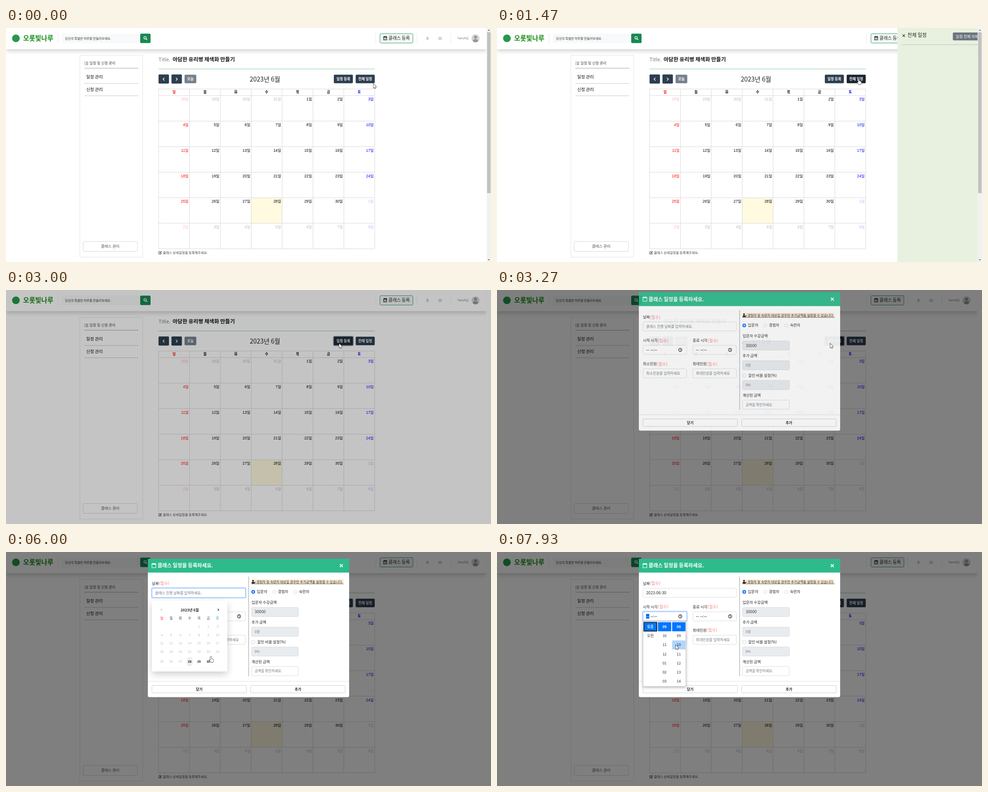
Write an HTML page with a canvas that moves like this. It is 1077 px wide and 520 px high and loops after 8 s.

```html
<!DOCTYPE html>
<html lang="ko">
<head>
<meta charset="utf-8">
<title>Class schedule</title>
<style>
html, body { margin: 0; width: 100%; height: 100%; overflow: hidden; background: #fff; }
canvas { display: block; width: 1077px; height: 520px; }
</style>
</head>
<body>
<canvas id="stage"></canvas>
<script>
const W = 1077, H = 520, LOOP = 8000, STEP = 1000 / 15;
const dpr = window.devicePixelRatio || 1;
const FONT = '"Noto Sans CJK KR", "Noto Sans CJK", sans-serif';
const ARIAL = '"Liberation Sans", "Noto Sans CJK KR", sans-serif';
const NAVY = '#2c3e50', GREEN = '#198754', HINT = '#6c757d';

function setup(canvas) {
  canvas.width = W * dpr;
  canvas.height = H * dpr;
  const ctx = canvas.getContext('2d');
  ctx.scale(dpr, dpr);
  return ctx;
}
const screenCtx = setup(document.getElementById('stage'));
const spare = document.createElement('canvas');
const spareCtx = setup(spare);
let g = screenCtx;

// ---- helpers ----
const clamp = v => Math.max(0, Math.min(1, v));
const progress = (t, start, length) => clamp((t - start) / length);
const smooth = p => p * p * (3 - 2 * p);
const easeInOut = p => p < .5 ? 2 * p * p : 1 - 2 * (1 - p) ** 2;
const easeOut = p => 1 - (1 - p) ** 1.85;

function text(s, x, y, size, color = '#222', weight = 400, align = 'left', font = FONT) {
  g.font = `${weight} ${size}px ${font}`;
  g.fillStyle = color;
  g.textAlign = align;
  g.fillText(s, x, y + size * .37);
}

function box(x, y, w, h, fill, stroke, r = 0) {
  g.beginPath();
  g.roundRect(x, y, w, h, r);
  if (fill) { g.fillStyle = fill; g.fill(); }
  if (stroke) { g.strokeStyle = stroke; g.lineWidth = .8; g.stroke(); }
}

function shadowBox(x, y, w, h, fill, r, dy, blur, alpha) {
  g.save();
  g.shadowColor = `rgba(0,0,0,${alpha})`;
  g.shadowBlur = blur * dpr;
  g.shadowOffsetY = dy * dpr;
  box(x, y, w, h, fill, null, r);
  g.restore();
}

function line(color, width, ...pts) {
  g.beginPath();
  for (let i = 0; i < pts.length; i += 2) g.lineTo(pts[i], pts[i + 1]);
  g.strokeStyle = color;
  g.lineWidth = width;
  g.stroke();
}

function disc(x, y, r, fill, stroke, width = 1) {
  g.beginPath();
  g.arc(x, y, r, 0, 7);
  if (fill) { g.fillStyle = fill; g.fill(); }
  if (stroke) { g.strokeStyle = stroke; g.lineWidth = width; g.stroke(); }
}

function cross(x, y, r, color, width) {
  line(color, width, x - r, y - r, x + r, y + r);
  line(color, width, x + r, y - r, x - r, y + r);
}

function chevron(x, y, dir, size, color, width) {
  line(color, width, x - dir * size / 2, y - size, x + dir * size / 2, y, x - dir * size / 2, y + size);
}

function calendarIcon(x, y, s, color) {
  g.strokeStyle = color;
  g.lineWidth = 1.1;
  g.strokeRect(x + .5, y + 1.5, s - 1, s - 1);
  g.fillStyle = color;
  g.fillRect(x, y + 1, s, 2.2);
  g.fillRect(x + s * .22, y - .4, 1.3, 2);
  g.fillRect(x + s * .64, y - .4, 1.3, 2);
}

function layer(alpha, draw) {
  if (alpha <= 0) return;
  if (alpha >= 1) return draw();
  spareCtx.clearRect(0, 0, W, H);
  g = spareCtx;
  draw();
  g = screenCtx;
  g.globalAlpha = alpha;
  g.drawImage(spare, 0, 0, W, H);
  g.globalAlpha = 1;
}

// ---- page ----
function header() {
  g.save();
  g.beginPath();
  g.rect(0, 0, 1067.5, H);
  g.clip();
  shadowBox(0, -10, 1067.5, 57, '#fff', 0, 4.5, 9, .17);
  g.restore();
  disc(22, 23, 8.5, '#25994a');
  text('오롯빛나루', 38, 22.5, 14.6, '#138a13', 900);
  for (const x of [115.5, 821, 912.5, 987.5]) line('#e4e6e8', .8, x, 12, x, 34);

  box(124, 12.5, 176, 21, '#f8f9fa', null, 2);
  text('당신의 특별한 하루를 만들어보세요.', 131, 23, 6.95, '#333');
  box(298, 12.5, 23, 21, GREEN, null, 2.5);
  disc(308.9, 21.8, 2.7, null, '#fff', 1.3);
  line('#fff', 1.5, 310.9, 23.8, 313.5, 26.4);

  box(830.4, 12.6, 73.2, 20.8, '#f1f8f4', GREEN, 2.5);
  calendarIcon(838, 18, 8, '#222');
  line('#222', 1, 840, 23.5, 841.6, 25, 844.2, 22.2);
  text('클래스 등록', 849.3, 22.7, 9.9, '#222');

  g.fillStyle = '#c9cedb';
  g.beginPath();
  g.moveTo(932.3, 25.2);
  g.quadraticCurveTo(933.6, 24, 933.6, 22);
  g.arc(936, 21.6, 2.4, Math.PI, 0);
  g.quadraticCurveTo(938.4, 24, 939.7, 25.2);
  g.fill();
  disc(936, 26, 1.1, '#c9cedb');
  box(960, 20, 8, 6.2, '#c9cedb', null, 1);
  line('#fff', .8, 960, 21.3, 964, 24, 968, 21.3);

  text('haru4님', 1003, 23, 6.6, '#777');
  disc(1042.6, 23, 9, '#d3d4d6');
  disc(1042.6, 20.4, 3.3, '#94979b');
  g.beginPath();
  g.ellipse(1042.6, 28.3, 5.8, 3.6, 0, 0, 7);
  g.fill();
}

function sidebar() {
  box(164, 61, 139.6, 448, null, '#dcdcdc');
  for (let i = 0; i < 3; i++) {
    const y = 75.8 + i * 2.8;
    line('#555', 1, 174, y, 175.6, y);
    line('#555', 1, 177, y, 182.6, y);
  }
  text('일정 및 신청 관리', 185.3, 78.5, 8.1, '#444');
  line('#9aa8a0', 1, 174, 89.3, 294, 89.3);
  text('일정 관리', 178, 108.8, 9.5, '#111', 500);
  line('#c8c8c8', 1, 174, 123.3, 294, 123.3);
  text('신청 관리', 178, 136.3, 9.5, '#111', 500);
  line('#c8c8c8', 1, 174, 150.6, 294, 150.6);
  box(171.4, 474.4, 120.4, 22, '#fff', '#cfcfcf', 2);
  text('클래스 관리', 231.4, 485, 8.5, '#555', 400, 'center');
}

function button(x, y, w, h, label, fill) {
  box(x, y, w, h, fill, null, 2);
  text(label, x + w / 2, y + h / 2 - .1, 7.9, '#fff', 700, 'center');
}

function calendar(t, pos) {
  text('Title.', 338.8, 70, 11, '#777');
  text('아담한 유리병 채색화 만들기', 370, 69.7, 11.8, '#111', 700);
  line('#c5e5d8', 2, 338.6, 91, 819, 91);

  const over = x => t < 2930 && pos.x > x && pos.x < x + 42.5 && pos.y > 103 && pos.y < 123;
  const focused = t > 2860 && t < 3430;
  box(338.7, 103.3, 23.2, 20.2, NAVY, null, 2);
  chevron(350.2, 113.7, -1, 3.1, '#fff', 1.4);
  box(367.4, 103.3, 23.2, 20.2, NAVY, null, 2);
  chevron(379, 113.7, 1, 3.1, '#fff', 1.4);
  button(396.5, 103.8, 26, 19, '오늘', '#76818c');
  text('2023년 6월', 575, 113.8, 14, '#222', 400, 'center');
  if (focused) box(726.2, 102, 46, 22.6, '#96a0a8', null, 4);
  button(728, 103.8, 42.3, 19, '일정 등록', focused || over(728) ? '#1e2b37' : NAVY);
  button(776.5, 103.8, 42.3, 19, '전체 일정', over(776.5) ? '#1a252f' : NAVY);

  const x0 = 338.9, cw = 68.55, y0 = 150.2, rh = 56.75;
  const hue = ['255,0,0', '0,0,0', '0,0,0', '0,0,0', '0,0,0', '0,0,0', '0,0,255'];
  g.fillStyle = '#fffae0';
  g.fillRect(x0 + 3 * cw, y0 + 4 * rh, cw, rh);
  for (let c = 0; c < 8; c++) line('#d9d9d9', 1, x0 + c * cw, 135.5, x0 + c * cw, y0 + 6 * rh);
  line('#d9d9d9', 1, x0, 135.5, x0 + 7 * cw, 135.5);
  for (let r = 0; r < 7; r++) line('#d9d9d9', 1, x0, y0 + r * rh, x0 + 7 * cw, y0 + r * rh);
  [...'일월화수목금토'].forEach((d, c) =>
    text(d, x0 + (c + .5) * cw, 142.2, 7.6, `rgb(${hue[c]})`, 700, 'center'));
  for (let i = 0; i < 42; i++) {
    const c = i % 7, n = i - 3, here = n > 0 && n <= 30;
    const day = n < 1 ? n + 31 : here ? n : n - 30;
    text(day + '일', x0 + (c + 1) * cw - 2.2, y0 + Math.floor(i / 7) * rh + 8, 8.4,
      `rgba(${hue[c]},${here ? 1 : .28})`, 400, 'right', ARIAL);
  }

  g.strokeStyle = '#444';
  g.lineWidth = 1;
  g.strokeRect(339.4, 497, 5, 5.4);
  line('#fff', 2.6, 342, 500, 346, 496);
  line('#444', 1.5, 341.6, 500.6, 345.6, 496.4);
  text('클래스 상세일정을 등록해주세요.', 348.2, 499.3, 7.35, '#444');
}

function scrollbar() {
  g.fillStyle = '#f1f1f1';
  g.fillRect(1067.5, 0, 9.5, H);
  g.fillStyle = '#c1c1c1';
  g.fillRect(1068.3, 9.5, 7.8, 357.5);
  g.fillStyle = '#555';
  for (const [y, d] of [[5, -1], [515, 1]]) {
    g.beginPath();
    g.moveTo(1070, y - d);
    g.lineTo(1074.4, y - d);
    g.lineTo(1072.2, y + d * 1.4);
    g.fill();
  }
}

function drawer(t) {
  const open = easeInOut(progress(t, 560, 300)) - easeInOut(progress(t, 1402, 300));
  if (open <= 0) return;
  const x = 1067.5 - 196.5 * open;
  g.save();
  g.beginPath();
  g.rect(0, 0, 1067.5, H);
  g.clip();
  g.fillStyle = '#e8f1df';
  g.fillRect(x, 0, 197, H);
  cross(x + 14, 17, 2.8, '#222', 1.1);
  text('전체 일정', x + 22, 16.3, 11, '#222', 500);
  box(x + 123, 10, 63, 17.5, HINT, null, 2);
  text('일정 전체 삭제', x + 154.5, 18.6, 8.4, '#fff', 400, 'center');
  line('#b9c1b2', 1, x + 10, 37, x + 186, 37);
  g.restore();
}

// ---- modal ----
function field(x, y, w, value, opt = {}) {
  if (opt.focus) box(x - 2, y - 2, w + 4, 25, '#c2dbfe', null, 4);
  box(x + .4, y + .4, w - .8, 20.2, opt.off ? '#e9ecef' : '#fff', opt.focus ? '#86b7fe' : '#ced4da', 2.5);
  text(value, x + 7.3, y + 10.4, opt.size || 8, opt.color || HINT);
}

function label(s, x, y, width) {
  text(s, x, y, 8.4, '#222');
  if (width) text('(필수)', x + width, y, 9.4, '#f58585');
}

function timeField(x, focus) {
  field(x, 132.5, 97.5, '', { focus });
  if (focus) box(331, 137.6, 7.2, 10.4, '#0b6be0');
  const dash = (dx, color) => line(color, .9, x + dx, 143.6, x + dx + 2.5, 143.6);
  [7.6, 11, 17.2, 20.4, 25.6, 28.8].forEach((dx, i) => dash(dx, focus && i < 2 ? '#fff' : '#333'));
  g.fillStyle = '#333';
  g.fillRect(x + 23.7, 141, .9, 1);
  g.fillRect(x + 23.7, 144.6, .9, 1);
  disc(x + 83, 143, 3.6, null, '#111', 1.1);
  line('#111', 1, x + 83, 140.6, x + 83, 143.2, x + 84.8, 144.2);
}

function modalBox(t) {
  const picked = t >= 6390;
  box(315, 15, 447, 307.5, '#fff', null, 3.5);
  box(315, 15, 447, 30.7, '#2dbb8b', null, [3.5, 3.5, 0, 0]);
  calendarIcon(323.6, 24.8, 9.6, '#fff');
  text('클래스 일정을 등록하세요.', 336.6, 30.3, 11.3, '#fff', 700);
  cross(744.6, 30.3, 3.2, '#fff', 1.9);

  label('날짜', 324, 70, 15.4);
  field(324, 80.3, 208, picked ? '2023-06-30' : '클래스 진행 날짜를 입력하세요.',
    { focus: t >= 3930 && t < 6450, color: picked ? '#222' : HINT, size: picked ? 8.7 : 8 });
  label('시작 시각', 324, 122, 33);
  label('종료 시각', 434.6, 122, 33);
  timeField(324, t >= 6990);
  timeField(434.5, false);
  label('최소인원', 324, 174, 31);
  label('최대인원', 434.6, 174, 31);
  field(324, 184.6, 97.5, '최소인원을 입력하세요');
  field(434.5, 184.6, 97.5, '최대인원을 입력하세요');

  line('#999', 1, 538.8, 54.5, 538.8, 276);
  box(545, 61, 204.5, 10.4, '#fdebd3');
  disc(548.6, 63.8, 1.9, '#222');
  box(545.6, 66.2, 6, 3.8, '#222', null, [2, 2, 0, 0]);
  line('#222', 1.4, 551, 69.6, 554, 66.4);
  text('경험자 및 숙련자 대상일 경우만 추가금액을 설정할 수 있습니다.', 556, 66.2, 7.4, '#222', 500);
  line('#222', .7, 545, 70.8, 749.5, 70.8);

  ['입문자', '경험자', '숙련자'].forEach((s, i) => {
    const x = 549 + i * 46.7;
    if (i) disc(x, 88.7, 3.6, '#fff', '#c5c9cd', .7);
    else { disc(x, 88.7, 4.1, '#0d6efd'); disc(x, 88.7, 1.7, '#fff'); }
    text(s, x + 8, 88.3, 8.4);
  });
  label('입문자 수강금액', 545.3, 112.2);
  field(545, 122.8, 104.6, '30000', { off: true, size: 8.8, color: '#333' });
  label('추가 금액', 545.3, 156.3);
  field(545, 166.7, 104.6, '0원', { off: true, size: 7.7 });
  box(545.6, 196.6, 7, 7, '#fff', '#c8ccd0', 1.4);
  label('할인 비율 설정(%)', 558, 200);
  field(545, 210.6, 104.6, '0%', { off: true, size: 7.7 });
  label('계산된 금액', 545.3, 243.7);
  field(545, 254.2, 104.6, '금액을 확인하세요.', { size: 7.7 });

  line('#dee2e6', 1, 315, 287.3, 762, 287.3);
  for (const [x, s] of [[324, '닫기'], [543.3, '추가']]) {
    box(x, 296.6, 210, 16.5, '#fff', '#bfc3c7', 1.5);
    text(s, x + 105, 304.9, 8, '#222', 700, 'center');
  }
}

function picker() {
  shadowBox(324, 108, 167.5, 157.5, '#fff', 2, 6, 16, .2);
  text('2023년 6월', 408, 128.6, 8.1, '#222', 700, 'center');
  chevron(345, 128.2, -1, 2.1, '#b5b5b5', 1.1);
  chevron(471.4, 128.2, 1, 2.1, '#222', 1.3);
  const col = c => 346 + 20.65 * c;
  [...'일월화수목금토'].forEach((d, c) =>
    text(d, col(c), 147, 7.5, c ? c === 6 ? '#1590d6' : '#444' : '#f22', 400, 'center'));
  g.beginPath();
  g.ellipse(407.8, 243.5, 7.3, 10.6, 0, 0, 7);
  g.fillStyle = '#eee';
  g.fill();
  for (let d = 1; d <= 30; d++) {
    const i = d + 3, row = Math.floor(i / 7), live = d >= 28;
    text(d, col(i % 7), row === 4 ? 243.5 : 165.6 + row * 18.45, 6.9,
      live ? '#222' : '#bcbcbc', live ? 700 : 400, 'center', ARIAL);
  }
}

function timeList(pos) {
  shadowBox(324, 154, 95.6, 145, '#fff', 2, 2, 6, .3);
  box(324.2, 154.2, 95.2, 144.6, '#fff', '#b9b9b9', 2);
  const two = n => String(n).padStart(2, '0');
  const hours = Array.from({ length: 7 }, (_, i) => two((i + 8) % 12 + 1));
  const minutes = Array.from({ length: 7 }, (_, i) => two(i + 8));
  [['오후', '오전'], hours, minutes].forEach((items, c) => {
    const x = 325.8 + c * 31.6;
    items.forEach((s, i) => {
      const y = 156 + i * 20.2;
      const hover = i && pos.x >= x && pos.x < x + 29.5 && pos.y >= y && pos.y < y + 20.2;
      if (!i || hover) box(x, y, 29.5, 20.2, i ? '#b0d5ff' : '#0075ff', null, 1);
      if (!c && !i) {
        g.strokeStyle = '#111';
        g.lineWidth = 1.6;
        g.strokeRect(x + .5, y + .5, 28.5, 19.2);
      }
      text(s, x + 14.7, y + 10.1, 7.9, i ? '#222' : '#fff', i ? 400 : 700, 'center');
    });
  });
}

// ---- pointer ----
const PATH = [
  [70, 816, 124], [400, 803.5, 113], [1500, 803.5, 113], [2070, 567, 113], [2130, 567, 113],
  [2400, 669.5, 114], [2870, 740, 119], [3270, 740, 119], [3730, 440, 91], [3930, 440, 91],
  [4300, 410, 92], [4730, 336, 91], [4800, 336, 91], [5400, 466, 145], [5670, 466, 145],
  [5990, 455, 232.5], [6530, 455, 232.5], [7000, 404, 141], [7600, 404, 142], [7900, 397, 206.5]
];

function pointerAt(t) {
  const i = PATH.findIndex(k => k[0] > t);
  if (i === 0) return { x: PATH[0][1], y: PATH[0][2] };
  const b = i < 0 ? PATH[PATH.length - 1] : PATH[i];
  const a = i < 0 ? b : PATH[i - 1];
  const p = a === b ? 1 : smooth((t - a[0]) / (b[0] - a[0]));
  return { x: a[1] + (b[1] - a[1]) * p, y: a[2] + (b[2] - a[2]) * p };
}

const ARROW = new Path2D('M0 0V9.4L2.2 7.4 3.6 10.6 5 10 3.7 6.9H6.5Z');
const HAND = new Path2D('M-1 1a1 1 0 0 1 2 0V5l3.6.8q1.2.4 1 1.6L5 10.5 4.4 12.6H.2L-3 8.4q-.9-1.3.3-1.5L-1 7.8Z');

function pointer(t, { x, y }) {
  const inRect = (l, top, r, b) => x > l && x < r && y > top && y < b;
  const onButton = t < 2930 && (inRect(728, 103, 770, 123) || inRect(776, 103, 819, 123));
  const onDay = t > 5900 && t < 6600 && inRect(440, 231, 462, 255);
  if (t > 3500 && t < 5300 && inRect(324, 80, 532, 102)) {
    line('#222', .9, x, y - 4.5, x, y + 4.5);
    for (const d of [-4.5, 4.5]) line('#222', .9, x - 1.8, y + d, x + 1.8, y + d);
    return;
  }
  const shape = onButton || onDay ? HAND : ARROW;
  g.save();
  g.translate(x, y);
  g.lineJoin = 'round';
  g.strokeStyle = '#222';
  g.lineWidth = 1.3;
  g.stroke(shape);
  g.fillStyle = '#fff';
  g.fill(shape);
  g.restore();
}

function draw(t) {
  const pos = pointerAt(t);
  g = screenCtx;
  g.fillStyle = '#fff';
  g.fillRect(0, 0, W, H);
  header();
  sidebar();
  calendar(t, pos);
  drawer(t);
  if (t < 2930) scrollbar();

  const shade = .5 * progress(t, 2931, 150);
  if (shade) {
    g.fillStyle = `rgba(0,0,0,${shade})`;
    g.fillRect(0, 0, W, H);
  }
  const dy = -50 * (1 - easeOut(progress(t, 3092, 300)));
  layer(progress(t, 3092, 194), () => {
    g.save();
    g.translate(0, dy);
    modalBox(t);
    g.restore();
  });
  layer(progress(t, 4000, 200) - progress(t, 6450, 150), picker);
  if (t >= 7060) timeList(pos);
  pointer(t, pos);
}

function tick() {
  const t = performance.now() % LOOP;
  draw(Math.floor((t + 5) / STEP) * STEP);
  requestAnimationFrame(tick);
}
tick();
</script>
</body>
</html>
```
